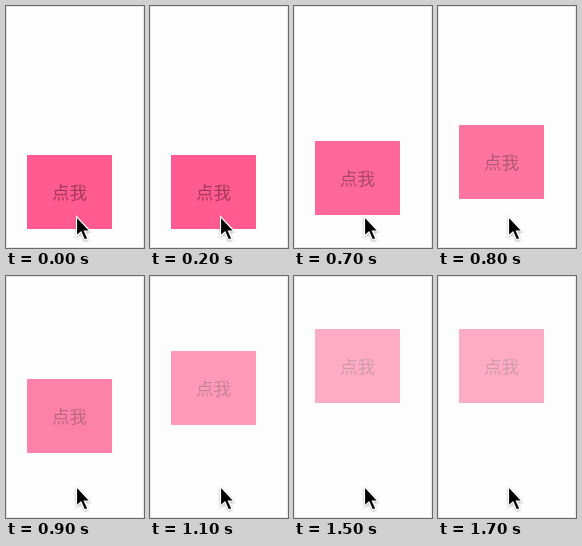
An HTML page that plays this animation: 138 px wide and 242 px high, repeating every 1800 ms.

```html
<!DOCTYPE html>
<html lang="zh">
<head>
<meta charset="utf-8">
<style>
html, body { margin: 0; width: 100%; height: 100%; overflow: hidden; }
#stage {
  position: relative; width: 138px; height: 242px; overflow: hidden;
  box-sizing: border-box; background: #fdfdfd; border: 1px solid #e6e6e6;
}
#button {
  position: absolute; left: 20px; top: -1px; width: 85px; height: 74px;
  background: #ff5b91; color: rgba(0, 0, 0, .36);
  font: 17.5px/74px "Noto Sans CJK SC", "Noto Sans CJK", sans-serif; text-align: center;
}
svg { position: absolute; left: -1px; top: -1px; filter: drop-shadow(0 1px 1px rgba(0, 0, 0, .3)); }
</style>
</head>
<body>
<div id="stage">
  <div id="button">点我</div>
  <svg width="138" height="242">
    <path d="M70.5 210.5V230L75 226L78.5 234L81.8 232.6L78.4 225H84Z" fill="#000" stroke="#fff" stroke-width="1.2"/>
  </svg>
</div>
<script>
const LOOP = 1800, STEP = 100;
// [time in ms, top edge in px]
const path = [[0, 149], [400, 149], [500, 147], [600, 141], [700, 135],
  [900, 103], [1100, 75], [1200, 63], [1300, 57], [1500, 53], [LOOP, 53]];
const [start, end] = [149, 53];
const button = document.getElementById("button");

function topAt(time) {
  const i = path.findIndex(([t]) => t > time);
  const [t0, y0] = path[i - 1], [t1, y1] = path[i];
  return y0 + (y1 - y0) * (time - t0) / (t1 - t0);
}

function draw() {
  const time = Math.floor(performance.now() % LOOP / STEP) * STEP;
  const y = topAt(time);
  button.style.transform = `translateY(${y}px)`;
  button.style.opacity = 1 - 0.5 * (start - y) / (start - end);
  requestAnimationFrame(draw);
}
draw();
</script>
</body>
</html>
```
